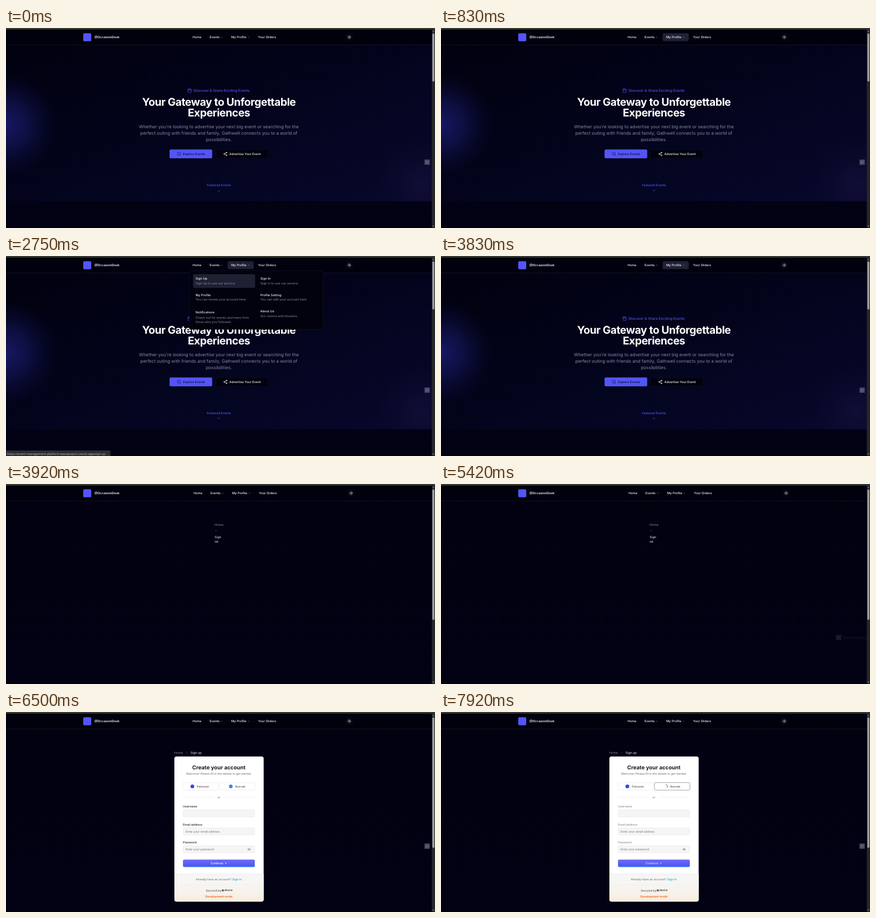
Recreate the animation shown at these times as an HTML page. Size 800 by 373 pixels, loop 8 s.

```html
<!DOCTYPE html>
<html lang="en">
<head>
<meta charset="utf-8">
<title>Event platform</title>
<style>
html, body { margin: 0; width: 100%; height: 100%; overflow: hidden; background: #02020f; }
svg { display: block; width: 100%; height: 100%; }
text { font-family: Inter, sans-serif; text-rendering: geometricPrecision; white-space: pre; }
.status { font-family: "DejaVu Sans", sans-serif; }
</style>
</head>
<body>
<svg id="stage" viewBox="0 0 800 373" xmlns="http://www.w3.org/2000/svg"></svg>
<script>
const LOOP = 8000;
const SM = 5.83, XS = 5.42;
const WHITE = '#f4f5fa', MUTED = '#858b9f', ACCENT = '#5355f6', INK = '#02020f';

// y is the middle of the capitals
const text = (x, y, str, size = SM, fill = WHITE, weight = 400, extra = '') =>
  `<text x="${x}" y="${(y + size * 0.36).toFixed(2)}" font-size="${size}" fill="${fill}" font-weight="${weight}" ${extra}>${str}</text>`;
const mid = (x, y, str, size, fill, weight, extra = '') =>
  text(x, y, str, size, fill, weight, 'text-anchor="middle" ' + extra);
const box = (x, y, w, h, fill, r = 0, extra = '') =>
  `<rect x="${x}" y="${y}" width="${w}" height="${h}" rx="${r}" fill="${fill}" ${extra}/>`;
const dot = (x, y, r, fill) => `<circle cx="${x}" cy="${y}" r="${r}" fill="${fill}"/>`;
const line = (x1, x2, y, color) => box(x1, y, x2 - x1, 0.6, color);
const group = (id, inner, extra = '') => `<g id="${id}" ${extra}>${inner}</g>`;

const shapes = {
  calendar: '<rect x="3" y="4" width="18" height="18" rx="2"/><path d="M8 2v4M16 2v4M3 10h18"/>',
  search: '<circle cx="11" cy="11" r="8"/><path d="m21 21-4.3-4.3"/>',
  share: '<circle cx="18" cy="5" r="3"/><circle cx="6" cy="12" r="3"/><circle cx="18" cy="19" r="3"/><path d="M8.6 13.5l6.8 4M15.4 6.5l-6.8 4"/>',
  sun: '<circle cx="12" cy="12" r="4"/><path d="M12 2v2M12 20v2M4.9 4.9l1.4 1.4M17.7 17.7l1.4 1.4M2 12h2M20 12h2M6.3 17.7l-1.4 1.4M19.1 4.9l-1.4 1.4"/>',
  down: '<path d="m6 9 6 6 6-6"/>',
  right: '<path d="m9 18 6-6-6-6"/>',
  eye: '<path d="M2 12c5-9 15-9 20 0c-5 9-15 9-20 0z"/><circle cx="12" cy="12" r="3.5"/>'
};
const icon = (name, x, y, size, color, sw = 2) => {
  const k = size / 24;
  return `<g transform="translate(${x - size / 2} ${y - size / 2}) scale(${k})" fill="none" stroke="${color}" stroke-width="${sw}" stroke-linecap="round" stroke-linejoin="round">${shapes[name]}</g>`;
};

const defs = `<defs>
  <linearGradient id="heroBg" x1="0" y1="0" x2="1" y2="1">
    <stop offset="0" stop-color="#01010f"/><stop offset=".5" stop-color="#03041c"/><stop offset="1" stop-color="#07082c"/>
  </linearGradient>
  <radialGradient id="glow">
    <stop offset="0" stop-color="#1b1b72" stop-opacity=".85"/><stop offset=".45" stop-color="#15165c" stop-opacity=".6"/><stop offset="1" stop-color="#0a0a38" stop-opacity="0"/>
  </radialGradient>
  <radialGradient id="haze">
    <stop offset="0" stop-color="#1c1440" stop-opacity=".5"/><stop offset="1" stop-color="#140e36" stop-opacity="0"/>
  </radialGradient>
  <linearGradient id="pageBg" x1="0" y1="0" x2="0" y2="1">
    <stop offset="0" stop-color="#010110"/><stop offset="1" stop-color="#020214"/>
  </linearGradient>
  <linearGradient id="footBg" x1="0" y1="0" x2="0" y2="1">
    <stop offset="0" stop-color="#f6f6f5"/><stop offset=".4" stop-color="#f7f6f3"/><stop offset="1" stop-color="#f8ecdf"/>
  </linearGradient>
  <linearGradient id="cta" x1="0" y1="0" x2="0" y2="1">
    <stop offset="0" stop-color="#6c6bf8"/><stop offset="1" stop-color="#5453f3"/>
  </linearGradient>
  <clipPath id="heroClip"><rect y="31" width="794" height="292"/></clipPath>
  <clipPath id="cardClip"><rect x="314" y="83" width="166.5" height="270.5" rx="4"/></clipPath>
</defs>`;

const hero = group('hero',
  box(0, 31, 794, 292, 'url(#heroBg)') +
  `<g clip-path="url(#heroClip)">
    <circle cx="0" cy="180" r="98" fill="url(#glow)"/><circle cx="775" cy="290" r="85" fill="url(#haze)"/>
  </g>` +
  icon('calendar', 342.4, 116.7, 8.4, ACCENT) +
  text(350, 116.8, 'Discover &amp; Share Exciting Events', 6.67, ACCENT, 500) +
  mid(397, 138.2, 'Your Gateway to Unforgettable', 20, '#fff', 700, 'letter-spacing="-.45"') +
  mid(397, 158.2, 'Experiences', 20, '#fff', 700, 'letter-spacing="-.45"') +
  ['Whether you\'re looking to advertise your next big event or searching for the',
   'perfect outing with friends and family, Gathwell connects you to a world of',
   'possibilities.'].map((s, i) => mid(397, 184.2 + i * 11.67, s, 8.33, MUTED, 400)).join('') +
  box(305, 226.5, 79.5, 16.5, ACCENT, 2.5) +
  icon('search', 322.5, 234.8, 8.4, '#0b0b35') +
  text(330, 234.8, 'Explore Events', SM, '#0b0b35', 500) +
  box(391, 226.7, 97.7, 16.2, INK, 2.5, 'stroke="#14162a" stroke-width=".5"') +
  icon('share', 409, 234.8, 8.4, WHITE) +
  text(416.6, 234.8, 'Advertise Your Event', SM, WHITE, 500) +
  mid(397, 292.4, 'Featured Events', SM, ACCENT, 500) +
  group('bounce', icon('down', 397, 304.2, 9, ACCENT)));

const header =
  box(0, 3, 794, 28, '#01010e') + line(0, 794, 31, '#1b1d2c') +
  box(144, 9.7, 15, 15, ACCENT, 2.5) +
  text(165, 17, '@OccasionDesk', SM, WHITE, 600) +
  group('nav',
    box(413.3, 9.8, 48.6, 14.7, '#1e2234', 2.5, 'id="hover"') +
    text(348, 17, 'Home', SM, WHITE, 500) +
    text(379.5, 17, 'Events', SM, WHITE, 500) +
    icon('down', 402.4, 17.4, 5, '#c9ccd8') +
    text(420, 17, 'My Profile', SM, WHITE, 500) +
    group('caret', icon('down', 452.5, 17.4, 5, '#c9ccd8')) +
    text(470, 17, 'Your Orders', SM, WHITE, 500)) +
  group('sun', box(633.5, 10.2, 13.5, 13.5, '#04040f', 3, 'stroke="#10121f" stroke-width=".5"') +
    icon('sun', 640.2, 17, 8, WHITE));

const entry = (x, y, title, ...rows) =>
  text(x, y, title, SM, WHITE, 500) +
  rows.map((s, i) => text(x, y + 8.8 + (rows.length > 1 ? 1 : 0) + i * 8.2, s, SM, MUTED)).join('');

const menu = group('menu',
  box(342, 27.3, 249.5, 109.7, INK, 2.5, 'stroke="#161929" stroke-width=".5"') +
  box(348.8, 34, 115.8, 25.6, '#1e2133', 2.5, 'id="pick"') +
  entry(353.5, 42, 'Sign Up', 'Sign Up to use our service.') +
  entry(474.3, 42, 'Sign In', 'Sign in to use our service.') +
  entry(353.5, 72.5, 'My Profile', 'You can review your account here.') +
  entry(474.3, 72.5, 'Profile Setting', 'You can edit your account here.') +
  entry(353.5, 104.6, 'Notifications', 'Check out for events and news from', 'those who you followed.') +
  entry(474.3, 103.3, 'About Us', 'Our visions and missions.'));

const status = group('status',
  box(-2, 363, 196.5, 12, '#2c2e33', 1.5, 'stroke="#44464b" stroke-width=".4"') +
  text(1.8, 368.6, 'https://event-management-platform-baseproject.vercel.app/sign-up', 5.41, '#b4b6ba', 400, 'class="status"'));

const narrowTrail = group('narrow',
  text(389, 75.8, 'Home', SM, MUTED) + icon('right', 391.8, 86.8, 5.4, MUTED) +
  text(389, 98.5, 'Sign', SM, WHITE) + text(389, 106.6, 'up', SM, WHITE));

const field = (y, label, hint) =>
  text(330, y, label, XS, '#212126', 500, 'class="dim"') +
  box(330.3, y + 6.4, 133.4, 13, '#f5f5f6', 2, 'stroke="#dedee1" stroke-width=".5"') +
  text(335, y + 13.2, hint, XS, '#74747c');

const provider = (x) => box(x, 132, 65.5, 13.5, '#fff', 2, 'stroke="#e2e2e5" stroke-width=".6"');

const card = group('card',
  text(313.7, 75.8, 'Home', SM, MUTED) + icon('right', 337.2, 75.8, 5.4, MUTED) +
  text(344, 75.8, 'Sign up', SM, WHITE) +
  `<g clip-path="url(#cardClip)">` +
    box(314, 83, 167, 271, '#fff') + box(314, 302, 167, 52, 'url(#footBg)') +
    line(314, 481, 301.7, '#e3e3e3') + line(314, 481, 321.8, '#e6e5e2') + '</g>' +
  mid(397, 103, 'Create your account', 10, '#18181b', 700) +
  mid(397, 115.5, 'Welcome! Please fill in the details to get started.', XS, '#6b6b74') +
  provider(330.3) + provider(398.5) +
  box(398.2, 131.6, 66, 14.2, 'none', 2.2, 'id="ring" stroke="#a9a9ad" stroke-width="1"') +
  dot(347.5, 138.8, 3.5, '#3d45e0') + text(356, 138.8, 'Palvoren', XS, '#55555d', 500) +
  group('badge', dot(419.2, 138.8, 3.5, '#4285f4')) +
  group('spin', '<path d="M0 -3.2A3.2 3.2 0 0 1 2.3 2.3" fill="none" stroke="#55555c" stroke-width=".9" stroke-linecap="round"/>') +
  text(427.6, 138.8, 'Norvek', XS, '#55555d', 500) +
  line(330.3, 387, 158.6, '#e4e4e7') + line(406.5, 463.8, 158.6, '#e4e4e7') +
  mid(396.8, 158.8, 'or', XS, '#6b6b74') +
  field(176.3, 'Username', '') +
  field(209.8, 'Email address', 'Enter your email address') +
  field(243.2, 'Password', 'Enter your password') +
  icon('eye', 453.5, 256.2, 6, '#5f5f67') +
  box(330.3, 277, 133.6, 12.6, '#35cdf5', 2.5) +
  box(330, 275.2, 134, 13.2, 'url(#cta)', 2.5) +
  group('go', text(381.5, 282, 'Continue', XS, '#fff', 500) + '<path d="M409 280.3l2.7 1.7-2.7 1.7z" fill="#c9c9ff"/>') +
  text(354, 312, 'Already have an account?', XS, '#6b6b74') +
  text(422, 312, 'Sign in', XS, '#12a5e8', 500) +
  text(372.5, 332.6, 'Secured by', XS, '#5c5c64', 500) +
  dot(404.4, 332.7, 2, '#55555d') + text(407.2, 332.4, 'dovra', XS, '#4a4a52', 700) +
  mid(397, 343.6, 'Development mode', XS, '#f0650e', 600));

const tool = group('tool',
  box(-5, -5, 10, 10, '#45475f', 1) +
  '<path d="M-3-1.5h2.5M.5-1.5H3M-3 1.2H2" stroke="#8d8fa8" stroke-width=".8" fill="none"/>' +
  group('keys', text(8.8, .2, 'Shortcut Not Set', 6.4, '#8d8fa8', 500, 'letter-spacing=".3"')) +
  group('ctrl', text(8.8, .2, 'Ctrl', 6.4, '#8d8fa8', 500)));

const chrome =
  box(0, 0, 800, 3, '#34372f') + box(794, 3, 6, 370, '#25262a') +
  box(795, 10, 4, 90, '#98999b', 2, 'id="thumb"') +
  '<path d="M795.3 7.2l1.7-2 1.7 2zM795.3 368.6l1.7 2 1.7-2z" fill="#98999b"/>';

const stage = document.getElementById('stage');
stage.innerHTML = defs + box(0, 0, 800, 373, 'url(#pageBg)') +
  hero + narrowTrail + card + header + menu + status + tool + chrome;

const el = id => document.getElementById(id);
const dims = [...document.querySelectorAll('.dim')];
const set = (id, name, value) => el(id).setAttribute(name, value);
const fade = (id, v) => {
  set(id, 'opacity', v);
  set(id, 'display', v > 0 ? 'inline' : 'none');
};
const ramp = (t, a, b) => Math.min(1, Math.max(0, (t - a) / (b - a)));
const ease = (t, a, b) => 1 - (1 - ramp(t, a, b)) ** 3;
const pulse = (t, on, off, d = 150) => ease(t, on, on + d) - ease(t, off, off + d);

function render(t) {
  const home = t < 3920, form = t >= 5830;
  fade('hero', +home);
  fade('narrow', +(!home && !form));
  fade('card', +form);

  const p = t / 1000 % 1;
  set('bounce', 'transform', `translate(0 ${-8 * p * (1 - p)})`);

  // the first opening is toggled shut by a click
  const open = pulse(t, 330, 640) + pulse(t, 960, 2900, 180);
  fade('hover', home ? ease(t, 90, 240) : 0);
  fade('menu', open);
  const k = 0.92 + 0.08 * open;
  set('menu', 'transform', `translate(466.7 27.3) scale(${k}) translate(-466.7 -27.3)`);
  set('caret', 'transform', `rotate(${180 * open} 452.5 17.2)`);
  fade('pick', pulse(t, 1750, 2850, 120));
  fade('status', +(t >= 1830 && t < 2950));

  const wide = !home && t < 5580;
  set('nav', 'transform', `translate(${wide ? 1.7 : 0} 0)`);
  set('sun', 'transform', `translate(${wide ? 3.4 : 0} 0)`);
  set('thumb', 'height', home ? 90 : 243.5);

  // floating toolbar fades in low, then tucks against the right edge
  const rise = ease(t, 5440, 5670);
  const slide = 26 * ease(t, 5440, 5700) + 8 * ramp(t, 5700, 5830) + 10 * ease(t, 5830, 6400);
  const shown = home || t >= 5420;
  const x = home ? 785.4 : 741 + slide + 0.4;
  set('tool', 'transform', `translate(${x} ${home ? 250.3 : 286.3 - 36 * rise})`);
  fade('tool', shown ? (home ? 1 : 0.3 + 0.7 * ramp(t, 5420, 5800)) : 0);
  fade('keys', home || t >= 5580 ? 0 : 0.6);
  fade('ctrl', home || t < 5580 ? 0 : 0.8 * (1 - ramp(t, 6080, 6400)));

  const busy = ramp(t, 7740, 7860);
  fade('ring', busy);
  fade('badge', +(t < 7750));
  fade('spin', +(t >= 7750));
  set('spin', 'transform', `translate(419.4 138.8) rotate(${(t - 7920) * 0.36})`);
  fade('go', 1 - 0.2 * busy);
  dims.forEach(d => d.setAttribute('opacity', 1 - 0.5 * busy));
}

let start;
function tick(now) {
  start ??= now;
  render((now - start) % LOOP);
  requestAnimationFrame(tick);
}
render(0);
requestAnimationFrame(tick);
</script>
</body>
</html>
```
